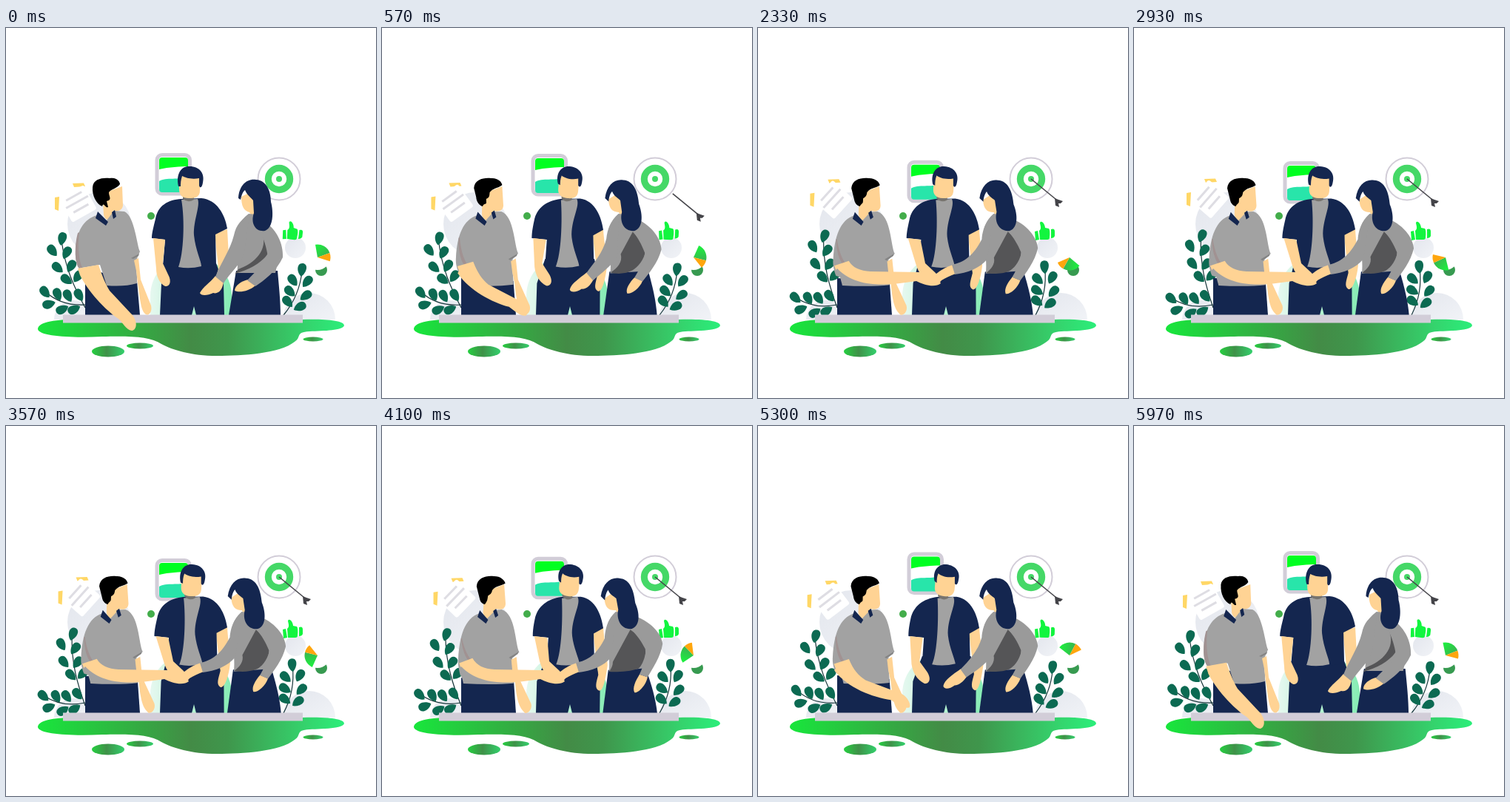
An HTML page for the animation above (6000 ms loop, 500 by 500 pixels).

```html
<!DOCTYPE html>
<html lang="en">
<head>
<meta charset="utf-8">
<title>Team agreement</title>
<style>
html, body { margin: 0; width: 100%; height: 100%; overflow: hidden; background: #fff; }
svg { display: block; width: 100vw; height: 100vh; }
</style>
</head>
<body>
<svg id="stage" viewBox="0 0 500 500">
  <defs>
    <linearGradient id="ground">
      <stop offset="0" stop-color="#18e63c"/><stop offset=".5" stop-color="#438b46"/>
      <stop offset=".62" stop-color="#3f964c"/><stop offset=".87" stop-color="#35d26c"/>
      <stop offset="1" stop-color="#2bee7a"/>
    </linearGradient>
    <linearGradient id="puddle">
      <stop offset="0" stop-color="#25d040"/><stop offset=".45" stop-color="#3f9148"/>
      <stop offset="1" stop-color="#33d06c"/>
    </linearGradient>
    <linearGradient id="mist" x2="1" y2="1">
      <stop offset="0" stop-color="#e3e6ed"/><stop offset="1" stop-color="#f1f3f7"/>
    </linearGradient>
    <linearGradient id="mint" x2="1" y2="0">
      <stop offset="0" stop-color="#e6f8f0"/><stop offset="1" stop-color="#86ecb4"/>
    </linearGradient>
    <linearGradient id="wedge" x2="1" y2="1">
      <stop offset="0" stop-color="#19f53c"/><stop offset="1" stop-color="#41a556"/>
    </linearGradient>
  </defs>

  <g fill="url(#mist)">
    <circle cx="126" cy="265" r="43"/>
    <path d="M374 394A35.500 36 0 0 1 445 394Z"/>
    <path d="M65 394A26 26 0 0 1 117 394Z"/>
    <circle cx="391" cy="297" r="14"/>
  </g>
  <path d="M195 388V362A55 55 0 0 1 305 362V388Z" fill="url(#mint)"/>
  <circle cx="196" cy="254" r="5" fill="#43ad4b"/>

  <g id="paper">
    <path d="M68 226L74 225L73 244L68 242ZM92 207L107 206.500L109 211L94 212Z" fill="#ffd766"/>
    <g id="sheet">
      <rect x="80" y="216" width="38" height="37" rx="3" fill="#fff"/>
      <path d="M87 223H111M82 232H116M88 242H111" stroke="#dedde3" stroke-width="3"/>
    </g>
  </g>

  <g id="device">
    <rect x="204" y="171.500" width="44.500" height="52.500" rx="7" fill="#fff" stroke="#d2cdd8" stroke-width="5"/>
    <path d="M207 191V179Q207 175 211 175H242Q246 175 246 179V187C236 187 220 188 207 191Z" fill="#00ff21"/>
    <path d="M207 207C216 201 234 206 246 201V218Q246 222 242 222H211Q207 222 207 218Z" fill="#28e5aa"/>
  </g>

  <circle cx="369" cy="204" r="28.500" fill="#fff" stroke="#d2cdd8" stroke-width="2"/>
  <circle cx="369" cy="204" r="14.700" fill="none" stroke="#45d867" stroke-width="9"/>
  <circle cx="369" cy="204" r="4" fill="#45d867"/>
  <g id="arrow">
    <path d="M369 204L405 233.500" stroke="#444449" stroke-width="1.600"/>
    <path d="M401 230L406 232L412 234L409 237L406 237L407 242L402 240Z" fill="#444449"/>
  </g>

  <g id="thumb" fill="#12f53f">
    <path d="M374 275L378 274L380 286L375 287ZM380 274C384 271 381 266 381 263C383 259 388 265 388 270L393 271Q395 273 394 283Q394 286 391 286L381 286ZM396 272Q401 270 401 275V281Q400 284 396 284Z"/>
  </g>

  <circle cx="426" cy="327" r="8" fill="#379a50"/>
  <circle cx="421" cy="310" r="17" fill="#fff"/>
  <g id="pie"></g>

  <g id="plants"></g>
  <path d="M43 407C43 395 80 393 110 394H400C430 393 457 395 457 402C455 409 430 409 410 410C390 411 400 418 390 424C370 440 320 443 285 443C250 443 225 435 210 427C195 417 170 416 130 417C90 419 45 417 43 407Z" fill="url(#ground)"/>
  <g fill="url(#puddle)">
    <ellipse cx="138" cy="437" rx="22" ry="7.500"/>
    <ellipse cx="181" cy="429.500" rx="18" ry="4"/>
    <ellipse cx="415" cy="420.500" rx="13.500" ry="3"/>
  </g>
  <g id="people"></g>
  <rect x="77" y="387.500" width="324" height="11" fill="#d2cdd8"/>
  <g id="arms"></g>
</svg>
<script>
const LOOP = 6000;
const SKIN = '#ffd394', NAVY = '#14264f', GREY = '#9a9a9a', LIGHT = '#a2a2a2', DARK = '#555557';
// How far each person stays leaned in between the two peaks.
const MIDDLE = 0.38, LEFT = 0.75, WOMAN = 0.68;
const $ = id => document.getElementById(id);

function make(parent, tag, attrs) {
  const el = document.createElementNS('http://www.w3.org/2000/svg', tag);
  for (const key in attrs) el.setAttribute(key, attrs[key]);
  return parent.appendChild(el);
}

const clamp = x => Math.max(0, Math.min(1, x));
const smooth = x => { x = clamp(x); return x * x * (3 - 2 * x); };

// Blend the numbers of two path strings of equal structure.
function morph(from, to, k) {
  const ends = to.match(/-?[\d.]+/g);
  let i = 0;
  return from.replace(/-?[\d.]+/g, n => (+n + (ends[i++] - n) * k).toFixed(2));
}

// Each shape follows its person's body; an optional second part follows the hands.
const shapes = [];
function shape(layer, person, fill, from, to, handFrom = '', handTo = '') {
  shapes.push({ el: make($(layer), 'path', { fill }), person, from, to, handFrom, handTo });
}

// Man in the middle
shape('people', MIDDLE, NAVY, 'M212 318L210 345L208 388L251 388L254 376L257 388L295 388L294 345L284 318Z',
  'M226 308L209 345L208 388L251 388L254 376L257 388L294 388L295 345L289 308Z');
shape('people', MIDDLE, SKIN,
  'M282 277L299 272C300 290 301 305 301 318C300 335 292 350 286 348C280 343 285 335 287 325Z',
  'M286 278L299 272C300 290 305 305 306 325C303 342 302 360 296 361C289 359 291 350 294 340Z');
shape('people', MIDDLE, NAVY,
  'M237 231C219 232 205 240 202 258C199 270 197 278 197 284L215 286L212 321Q248 328 284 321L283 279L299 271C296 252 285 232 264 230Z',
  'M244 231C226 234 212 244 208 262C206 272 206 278 206 284L228 286L226 318Q252 328 288 320L287 281L299 274C297 258 290 234 270 231Z');
shape('people', MIDDLE, LIGHT,
  'M237 232L259 231C263 240 253 260 254 280C256 300 264 315 264 322Q248 326 233 323C240 305 242 260 237 232Z',
  'M245 233L266 231C272 240 256 260 258 285C260 300 266 312 268 321Q252 325 236 322C244 305 245 260 245 233Z');
shape('people', MIDDLE, '#77746f', 'M239 224L254 226L254 232Q246 237 239 231Z', 'M245 224L259 226L258 233Q251 237 245 230Z');
shape('people', MIDDLE, SKIN, 'M234 200L262 200L262 220C262 229 255 230 247 230C238 230 234 226 234 218Z',
  'M243 200L270 201L267 222C265 230 259 231 253 230C245 229 240 224 241 218Z');
shape('people', MIDDLE, NAVY,
  'M233 214C229 196 238 186 248 187C262 187 269 197 266 209C265 216 262 217 261 213L261 203C250 205 242 202 238 200C236 206 236 210 236 214Z',
  'M241 208C238 194 247 186 257 187C270 189 276 198 273 208C272 214 270 215 268 213L268 204C258 206 250 203 246 199C244 203 244 207 244 211Z');

// Man on the left
shape('people', LEFT, NAVY, 'M107 325L107 388L181 388L177 342Z', 'M107 342L107 388L181 388L178 342Z');
shape('people', LEFT, SKIN, 'M131 236L135 222L157 214L158 240C157 248 148 248 144 247L147 252C142 260 134 262 132 252Z',
  'M138 240L146 222L166 214L168 240C168 248 161 249 155 247L155 254C149 262 139 264 137 252Z');
shape('people', LEFT, LIGHT,
  'M123 253C105 258 95 275 94 300C93 315 97 325 103 324L127 320C132 335 135 345 136 348Q160 350 177 345C178 330 173 320 178 309L181 302C177 295 174 254 160 248L146 247L136 260Z',
  'M133 253C112 260 106 285 104 316C103 322 105 330 106 338L106 342C106 344 107 346 107 348Q150 350 178 348C178 335 175 325 176 314L186 306C180 295 182 254 162 248L154 249L143 260Z');
shape('people', LEFT, '#a19292', 'M97 277C92 295 93 320 99 325L103 324C97 310 97 290 99 276Z',
  'M108 288C110 302 115 314 121 318L123 316C117 310 112 300 109 288Z');
shape('people', LEFT, '#848484', 'M169 311L180 305L179 308L172 312Z', 'M172 313L185 305L184 308L174 315Z');
shape('people', LEFT, NAVY, 'M124 248L138 262L135 267L121 257ZM143 249L147 246L149 255L145 258Z',
  'M133 249L144 262L141 267L130 258ZM151 250L155 247L158 256L154 259Z');
shape('people', LEFT, '#000',
  'M117 215C118 204 130 202 140 203C150 201 154 208 154 211C150 217 143 217 139 222C139 228 144 232 136 234L138 242C134 244 132 234 130 241C122 238 116 226 117 215Z',
  'M129 217C130 205 142 202 152 203C161 203 167 208 168 213C160 217 156 215 150 222C149 227 146 227 144 229C143 233 143 236 142 238L140 241C137 241 135 239 134 237C130 232 128 225 129 217Z');

// Woman
shape('people', WOMAN, NAVY, 'M311 328L367 328C369 350 371 370 371 388L301 388Z', 'M305 330L354 325C364 350 370 370 372 388L298 388Z');
shape('people', WOMAN, SKIN, 'M318 228L334 220L340 250L334 258L329 249C321 247 318 240 318 228Z',
  'M298 234L314 222L323 250L318 258L314 249C304 250 299 246 298 234Z');
shape('people', WOMAN, GREY,
  'M328 251C315 260 309 275 309 290C313 305 314 320 312 331L364 331C370 310 368 285 357 268L338 252Z',
  'M314 251C304 260 300 275 302 290C306 305 307 320 306 332L352 327C358 315 358 290 352 268L322 252Z');
shape('people', WOMAN, DARK,
  'M346 276C352 288 356 300 353 306C345 318 325 328 312 331C308 335 310 331 314 326C336 318 355 300 346 276Z',
  'M334 275C350 285 358 295 357 304C356 318 353 325 352 327C340 332 315 333 306 333C306 329 306 327 307 325C340 323 356 302 334 275Z');
shape('people', WOMAN, SKIN, 'M327 340L337 348C328 356 315 358 309 355C309 348 318 342 327 340Z',
  'M351 335L362 338C361 350 350 362 346 361C342 355 346 345 351 335Z');
shape('people', WOMAN, GREY,
  'M344 258C366 270 375 292 374 310C366 328 348 342 337 349L326 341C338 328 350 318 354 310C352 295 348 285 344 276Z',
  'M334 254C364 262 378 280 380 292C378 310 368 326 362 338L351 335C357 322 358 308 356 300C350 290 344 282 336 275Z');
shape('people', WOMAN, NAVY,
  'M314 230C315 212 326 203 338 205C352 206 358 220 358 235C362 250 361 270 350 274C338 276 330 265 335 250L334 233C330 228 326 226 323 219C319 222 318 228 317 232Z',
  'M293 230C296 212 307 204 318 206C334 207 338 225 340 240C346 252 348 270 336 274C322 276 314 262 317 248L314 233C310 230 305 228 303 222C300 226 299 232 299 236Z');

// Arms in front of the table
shape('arms', MIDDLE, SKIN, 'M199 284L215 286', 'M208 284L226 286',
  'L212 318L219 333C225 344 220 350 215 349C207 345 203 335 203 325Z',
  'L226 318L240 331C248 341 244 348 237 347C224 340 217 332 213 318Z');
shape('arms', LEFT, SKIN,
  'M173 314L179 311L182 340L196 375C198 384 193 389 189 387C182 382 182 370 178 345L176 328Z',
  'M175 316L182 312L185 340L202 375C204 382 199 388 194 388C185 380 182 370 180 345L176 330Z');
shape('arms', LEFT, SKIN, 'M100 334L97 325L125 320', 'M107 325L105 320L122 313',
  'C130 335 134 345 140 355L168 385C178 394 178 408 170 409C162 408 158 398 152 393C135 382 110 355 100 334Z',
  'C128 324 138 328 152 329L218 330C232 326 245 340 247 345C240 351 225 348 214 342C180 347 135 354 107 325Z');
shape('arms', WOMAN, SKIN, 'M0 0', 'M0 0',
  'M283 335L294 344C292 354 287 360 280 358C272 362 263 362 262 358C266 350 275 345 283 335Z',
  'M263 320L267 332C259 335 253 338 248 341C243 348 236 349 236 343C235 334 247 326 263 320Z');
shape('arms', WOMAN, GREY, 'M329 254C318 258 311 266 308 280', 'M314 254C304 258 300 276 300 288',
  'C303 300 290 318 283 336L294 345C302 332 318 318 322 305Z',
  'C291 308 278 317 262 320L266 333C282 331 300 325 310 312Z');

// Plants: base point, swing in degrees, stem and leaves [x, y, angle]
function plant(base, swing, stem, leaves) {
  const el = make($('plants'), 'g', {});
  make(el, 'path', { d: stem, fill: 'none', stroke: '#17363a', 'stroke-width': 1.2 });
  for (const [x, y, angle] of leaves) {
    make(el, 'path', { d: 'M0 9C-8 3 -8 -9 0 -9C8 -9 7 3 0 9Z', fill: '#0c6a52',
      transform: `translate(${x} ${y}) rotate(${angle})` });
  }
  return { el, base, swing };
}
const plants = [
  plant([107, 378], 9.5, 'M107 378C92 350 80 325 75 287',
    [[76, 285, 12], [63, 301, -38], [82, 304, 28], [70, 324, -48], [88, 322, 30], [82, 340, -52], [97, 336, 35]]),
  plant([107, 376], -9, 'M107 374C90 375 70 372 53 356',
    [[53, 357, -38], [58, 373, -105], [70, 360, -22], [76, 380, -115], [84, 362, -28], [92, 380, -115], [99, 361, -30]]),
  plant([375, 388], -13, 'M375 388C390 370 398 350 400 328',
    [[400, 327, 8], [388, 341, -35], [407, 343, 40], [384, 356, -45], [405, 362, 55], [381, 370, -40], [397, 377, 65]])
];

function sector(start, end, r, fill) {
  const at = deg => {
    const a = deg * Math.PI / 180;
    return `${r * Math.cos(a)} ${r * Math.sin(a)}`;
  };
  make($('pie'), 'path', { fill, d: `M0 0L${at(start)}A${r} ${r} 0 0 1 ${at(end)}Z` });
}
sector(-100, -20, 17.5, 'url(#wedge)');
sector(-20, 17, 17.5, '#ffa60d');

const place = (id, value) => $(id).setAttribute('transform', value);

function draw(t) {
  const u = Math.min(t, LOOP - t);
  const lean = smooth(Math.pow(u / 1470, 0.6));
  const relax = smooth((u - 1470) / 1000);
  const hands = (1 - Math.cos(Math.PI * clamp(u / 1500))) / 2;
  const sway = (1 - Math.cos(2 * Math.PI * t / LOOP)) / 2;

  for (const s of shapes) {
    const body = lean - (1 - s.person) * relax;
    const hand = s.handFrom && morph(s.handFrom, s.handTo, hands);
    s.el.setAttribute('d', morph(s.from, s.to, body) + hand);
  }
  for (const p of plants) p.el.setAttribute('transform', `rotate(${p.swing * sway} ${p.base})`);

  place('device', `translate(0 ${11 * sway})`);
  place('paper', `translate(${-2 + 5 * sway} ${3 - 6 * sway})`);
  place('sheet', `rotate(${-39 + 10 * (1 - lean) - 10 * sway} 99 234)`);
  place('thumb', `rotate(${7 * (1 - lean)} 388 276)`);
  place('pie', `translate(421 310) rotate(${360 * t / LOOP})`);

  const flight = Math.max(0, 690 - t) / 120;
  place('arrow', `translate(${24 * flight} ${20 * flight})`);
  $('arrow').setAttribute('opacity', clamp((t - 460) / 60));
}

function tick(now) {
  draw(now % LOOP);
  requestAnimationFrame(tick);
}
draw(0);
requestAnimationFrame(tick);
</script>
</body>
</html>
```
